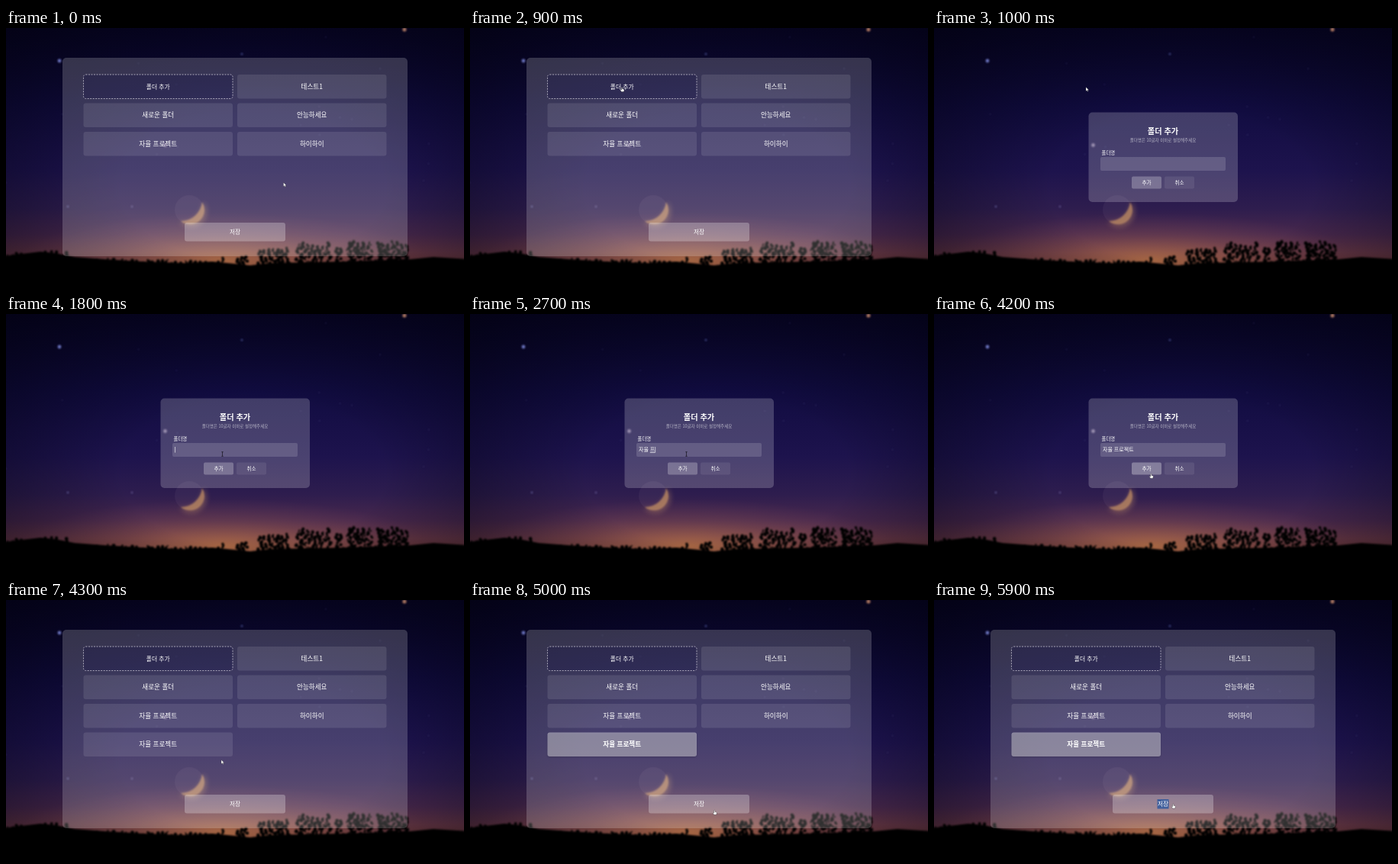
An HTML page that plays this animation: 600x338 px, repeating every 6 s.

```html
<!DOCTYPE html>
<html lang="ko">
<head>
<meta charset="utf-8">
<style>
  html, body { margin: 0; width: 100%; height: 100%; overflow: hidden; background: #000; }
  svg { display: block; width: 100%; height: 100%; }
  text { font-family: "Noto Sans CJK KR", "Noto Sans CJK JP", "Noto Sans CJK", sans-serif; fill: #fff; white-space: pre; }
</style>
</head>
<body>
<svg viewBox="0 0 600 338" preserveAspectRatio="none">
  <defs>
    <linearGradient id="sky" x2="0" y2="1">
      <stop offset="0" stop-color="#09062a"/>
      <stop offset=".3" stop-color="#110c41"/>
      <stop offset=".55" stop-color="#1d134d"/>
      <stop offset=".7" stop-color="#2e1d4e"/>
      <stop offset=".8" stop-color="#48284c"/>
      <stop offset=".87" stop-color="#683845"/>
      <stop offset=".91" stop-color="#6a3838"/>
    </linearGradient>
    <radialGradient id="dusk">
      <stop offset="0" stop-color="#d48a48" stop-opacity=".55"/>
      <stop offset=".5" stop-color="#c07858" stop-opacity=".22"/>
      <stop offset="1" stop-color="#a06068" stop-opacity="0"/>
    </radialGradient>
    <radialGradient id="edges" cx=".54" cy=".62" r=".82">
      <stop offset=".35" stop-color="#020110" stop-opacity="0"/>
      <stop offset="1" stop-color="#020110" stop-opacity=".75"/>
    </radialGradient>
    <filter id="soft" x="-50%" y="-50%" width="200%" height="200%"><feGaussianBlur stdDeviation="1.3"/></filter>
    <filter id="glow" x="-50%" y="-50%" width="200%" height="200%"><feGaussianBlur stdDeviation="3"/></filter>
    <filter id="edge"><feGaussianBlur stdDeviation=".9"/></filter>
  </defs>

  <rect width="600" height="338" fill="url(#sky)"/>
  <ellipse cx="285" cy="304" rx="270" ry="62" fill="url(#dusk)"/>
  <rect width="600" height="338" fill="url(#edges)"/>
  <g id="stars" filter="url(#soft)"></g>
  <circle cx="240" cy="238" r="19" fill="#a890a8" opacity=".08"/>
  <g fill="#b08060">
    <path d="M258 227A20 20 0 0 1 227 254A28 28 0 0 0 258 227" opacity=".4" filter="url(#glow)"/>
    <path d="M257 228A19 19 0 0 1 229 253A28 28 0 0 0 257 228" opacity=".85" filter="url(#soft)"/>
  </g>
  <g id="trees" fill="#050304" filter="url(#edge)">
    <path d="M-5 299L20 296L45 293L65 295L90 300L130 303L180 306L235 308L270 306L320 311L345 308L440 306L530 303L560 300L605 303V345H-5Z"/>
  </g>

  <g id="list"></g>
  <g id="dialog"></g>

  <g id="arrow"><path d="M0 0V5.2L1.3 4.1L2.1 5.8L3 5.4L2.2 3.7H3.8Z" fill="#fff" stroke="#222" stroke-width=".3"/></g>
  <g id="hand"><path d="M-.6 .4Q0 -.5 .6 .4V2.2L2.6 2.8Q3.2 3.1 3 4L2.4 6H-.6L-2.2 3.8Q-2 2.9 -.6 3.7Z" fill="#fff" stroke="#222" stroke-width=".35"/></g>
  <g id="beam"><path d="M-1.2 -2.8H1.2M0 -2.8V2.8M-1.2 2.8H1.2" fill="none" stroke="#16131f" stroke-width=".7"/></g>
</svg>

<script>
const $ = id => document.getElementById(id);

function set(el, attrs) {
  for (const name in attrs) el.setAttribute(name, attrs[name]);
  return el;
}
function add(parent, tag, attrs, content = '') {
  const el = set(document.createElementNS('http://www.w3.org/2000/svg', tag), attrs);
  el.textContent = content;
  return parent.appendChild(el);
}
const box = (parent, [x, y, width, height], alpha, rx = 3) =>
  add(parent, 'rect', { x, y, width, height, rx, fill: '#fff', 'fill-opacity': alpha });
const label = (parent, content, x, y, size, attrs = {}) =>
  add(parent, 'text', { x, y, 'font-size': size, 'font-weight': 500, 'text-anchor': 'middle', ...attrs }, content);
const show = (el, on) => el.setAttribute('visibility', on ? 'inherit' : 'hidden');

// Scenery
let seed = 7;
const random = () => (seed = seed * 16807 % 2147483647) / 2147483647;
const star = (cx, cy, r, fill, opacity) => add($('stars'), 'circle', { cx, cy, r, fill, opacity });
star(70, 43, 2.4, '#7f8ce0', .8);
star(522, 2, 2.6, '#d09070', .8);
star(208.5, 153.5, 2.4, '#b0a0c0', .7);
star(309, 34, 1.6, '#6070c0', .5);
star(81, 234, 1.4, '#8080c0', .5);
star(165, 234, 1.4, '#8070b0', .5);
for (let i = 0; i < 16; i++) star(random() * 600, random() * 220, .9, '#8080c0', .25);

// Each tree is a loose stack of leaf blobs, wider towards its foot.
function grove(from, to, top, base) {
  for (let x = from; x <= to; x += 5 + random() * 3) {
    const tip = top + random() * 6;
    for (let y = tip; y < base; y += 1.8) {
      const spread = 1 + 3 * Math.min(1, (y - tip) / 9);
      add($('trees'), 'circle', { cx: x + (random() - .5) * 2 * spread, cy: y, r: 1 + random() * 1.5 });
    }
  }
}
grove(2, 85, 293, 303);
grove(95, 265, 302, 310);
grove(279, 291, 300, 310);
grove(303, 316, 300, 312);
grove(332, 372, 287, 310);
grove(384, 424, 281, 310);
grove(433, 442, 285, 310);
grove(450, 482, 277, 308);
grove(488, 528, 279, 306);

// Folder list
const list = $('list');
box(list, [74, 39, 452, 260], .19, 5);
const cell = i => [i % 2 ? 303 : 101.5, 61 + 37.5 * (i >> 1), 195.5, 31.5];
const names = ['폴더 추가', '테스트1', '새로운 폴더', '안능하세요', '자율 프로젝트', '하이하이', '자율 프로젝트'];
const items = names.map((name, i) => {
  const g = add(list, 'g', {});
  const [x, y, w, h] = cell(i);
  const rect = box(g, cell(i), .1);
  const text = label(g, name, x + w / 2, y + h / 2 + 3, i ? 8.6 : 7.8);
  return { g, rect, text };
});
set(items[0].rect, { fill: '#0c0840', 'fill-opacity': .25, stroke: '#c4c0d0', 'stroke-width': .8, 'stroke-dasharray': '2 1.5' });
const newest = items[6];
const saveBox = [234, 255, 132, 24.5];
box(list, saveBox, .26);
const selection = add(list, 'rect', { x: 292.5, y: 261, width: 15, height: 12.5, fill: '#405f9c' });
label(list, '저장', 300, 270, 7.7);

// Dialog
const dialog = $('dialog');
const inputBox = [218, 169, 164, 18], addBox = [259, 194.5, 39, 16], cancelBox = [302, 194.5, 39, 16];
box(dialog, [202.5, 110.5, 195.5, 117.5], .2, 5);
label(dialog, '폴더 추가', 300, 138.7, 10.2, { 'font-weight': 700 });
label(dialog, '폴더명은 10글자 이하로 설정해주세요', 300, 149, 5.5, { opacity: .6 });
label(dialog, '폴더명', 219.5, 165.5, 6.4, { 'text-anchor': 'start' });
box(dialog, inputBox, .15, 2);
const addButton = box(dialog, addBox, .25, 2);
box(dialog, cancelBox, .08, 2);
label(dialog, '추가', 278.5, 204.9, 6.6);
label(dialog, '취소', 321.5, 204.9, 6.6);
const field = label(dialog, '', 221, 180.3, 7, { 'text-anchor': 'start' });
const settled = add(field, 'tspan', {});
const composing = add(field, 'tspan', { 'text-decoration': 'underline' });
const caret = add(dialog, 'rect', { y: 174, width: .6, height: 7.6, fill: '#fff' });

// Timeline
const OPEN = 1000, FOCUS = 1700, BLUR = 4100, CLOSE = 4300, PICK = 4600, SELECT = 5500, LOOP = 6000;
const typing = [
  [2000, 'ㅈ'], [2100, '자'], [2200, '장'], [2300, '자유'], [2500, '자율'], [2600, '자율 '],
  [2700, '자율 프'], [2800, '자율 플'], [2900, '자율 프로'], [3000, '자율 프롲'], [3100, '자율 프로제'],
  [3200, '자율 프로젝'], [3300, '자율 프로젝ㅌ'], [3500, '자율 프로젝트']
];
const path = [
  [0, 363.5, 202.5], [800, 199, 77.5], [1000, 199, 77.5], [1500, 283.5, 183.5],
  [3900, 283.5, 183.5], [4200, 284.3, 209.2], [4300, 282, 209.5], [4500, 270, 194],
  [4600, 270, 194], [5000, 320.3, 275.3], [5200, 313.3, 267], [LOOP, 313.3, 267]
];

function pointer(t) {
  const i = path.findIndex(p => p[0] > t);
  const [t0, x0, y0] = path[i - 1], [t1, x1, y1] = path[i];
  const u = (t - t0) / (t1 - t0), k = u * u * (3 - 2 * u);
  return [x0 + (x1 - x0) * k, y0 + (y1 - y0) * k];
}
const inside = (px, py) => ([x, y, w, h]) => px >= x && px <= x + w && py >= y && py <= y + h;

function render(t) {
  const open = t >= OPEN && t < CLOSE, created = t >= CLOSE, picked = t >= PICK;
  show(list, !open);
  show(dialog, open);
  show(newest.g, created);
  set(newest.rect, { 'fill-opacity': picked ? .4 : .1 });
  newest.rect.style.filter = picked ? 'drop-shadow(0 1px 1px rgba(0,0,0,.4))' : '';
  set(newest.text, { 'font-weight': picked ? 700 : 500 });
  show(selection, t >= SELECT);

  const typed = typing.filter(key => key[0] <= t).pop()?.[1] ?? '';
  const pending = t < BLUR && typed && !typed.endsWith(' ') ? 1 : 0;
  settled.textContent = typed.slice(0, typed.length - pending);
  composing.textContent = typed.slice(typed.length - pending);
  show(caret, open && t >= FOCUS && t < BLUR);
  set(caret, { x: 221.2 + field.getComputedTextLength() });

  const [x, y] = pointer(t), hit = inside(x, y);
  const targets = open ? [addBox, cancelBox] : [saveBox, ...names.slice(0, created ? 7 : 6).map((_, i) => cell(i))];
  const kind = open && hit(inputBox) ? 'beam' : targets.some(hit) ? 'hand' : 'arrow';
  set(addButton, { 'fill-opacity': open && hit(addBox) ? .31 : .25 });
  for (const id of ['arrow', 'hand', 'beam']) {
    show($(id), id === kind);
    set($(id), { transform: `translate(${x} ${y})` });
  }
}

const start = performance.now();
function tick() {
  const t = (performance.now() - start) % LOOP;
  render(Math.floor(t / 100) * 100);
  requestAnimationFrame(tick);
}
tick();
</script>
</body>
</html>
```
